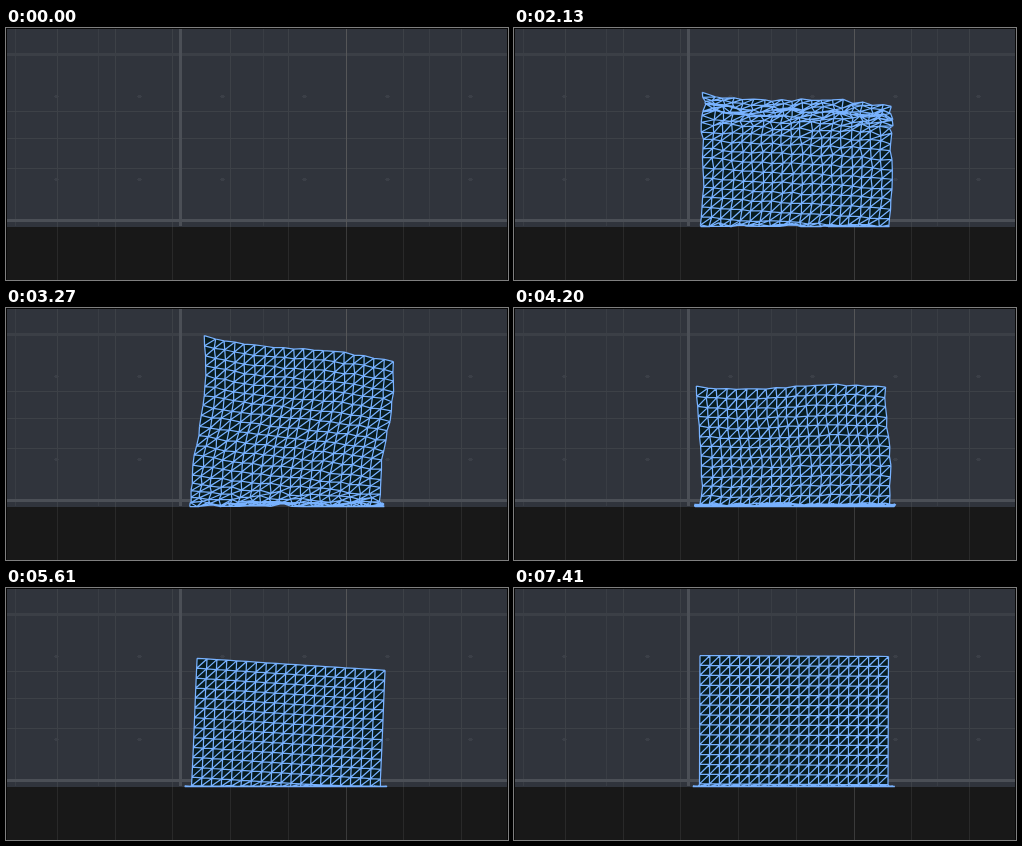
An HTML page with a canvas that plays this animation: 502 px wide and 252 px high, repeating every 7500 ms.

```html
<!DOCTYPE html>
<html lang="en">
<head>
<meta charset="utf-8">
<title>Soft body mesh</title>
<style>
  html, body { margin: 0; width: 100%; height: 100%; overflow: hidden; background: #181818; }
  canvas { display: block; }
</style>
</head>
<body>
<canvas id="stage" width="502" height="252"></canvas>
<script>
const ctx = document.getElementById('stage').getContext('2d');
const LOOP = 7500, STEP = 30, LAST = 7410;
const DROP = 480, HIT = 1230, SQUASHED = 1650, LANDED = 4200;
const COLS = 19, ROWS = 20, CELL = 9.9, FLOOR = 198, REST = 67, LEFT = 185;

const ramp = (v, a, b) => Math.max(0, Math.min(1, (v - a) / (b - a)));
const mix = (a, b, k) => a + (b - a) * k;
const smooth = k => k * k * (3 - 2 * k);
const hump = (t, a, b) => Math.sin(Math.PI * ramp(t, a, b));
const noise = (i, j) => {
  const n = Math.sin(i * 127.1 + j * 311.7) * 43758.5;
  return n - Math.floor(n) - 0.5;
};

// Eases through [time, value] points
function track(t, points) {
  let i = 0;
  while (i < points.length - 2 && t >= points[i + 1][0]) i++;
  const [[t0, v0], [t1, v1]] = points.slice(i, i + 2);
  return mix(v0, v1, smooth(ramp(t, t0, t1)));
}

// Height of the top left corner: fall, crush, rebound, then a fading bob
function topAt(t) {
  if (t < HIT) return 2 + 213 * (((t - DROP) / (HIT - DROP)) ** 2 - 1);
  if (t < SQUASHED) return mix(128, 2, (1 - ramp(t, HIT, SQUASHED)) ** 3);
  if (t < LANDED) return track(t, [[SQUASHED, 128], [2450, 32], [3270, 28], [3700, 88], [LANDED, 78]]);
  return REST + 11.5 * ramp(t, 6800, 6000) * Math.cos((t - LANDED) / 1165 * 2 * Math.PI);
}

function meshAt(t) {
  const top = topAt(t);
  const tilt = track(t, [[HIT, 12], [2130, 12], [3270, 25], [LANDED, 0], [5610, 12], [LAST, 1]]);
  const rough = ramp(t, HIT, 1440) * ramp(t, 5600, LANDED);
  const sway = 2.5 * ramp(t, HIT, 1440) * ramp(t, 6800, 6000) * Math.cos((t - LANDED) / 930 * Math.PI);

  // The impact folds the upper rows together and the fold spreads downwards
  const pitch = CELL + 6 * hump(t, HIT, SQUASHED);
  const fold = 0.92 * hump(t, HIT, 2400) ** 0.3;
  const foldWidth = 2 + Math.max(0, t - 1440) / 276;

  const floor = FLOOR + 15 * ramp(t, HIT + 90, HIT);
  const soft = 1.5 + 10 * hump(t, 2400, LANDED);
  const rest = y => floor - soft * Math.log(1 + Math.exp((floor - y) / soft));

  const rows = [];
  let drop = 0;
  for (let r = 0; r <= ROWS; r++) {
    const gap = pitch * (1 - fold * Math.exp(-(((r - 4) / foldWidth) ** 2)));
    if (r) drop += gap;
    rows.push(Array.from({ length: COLS + 1 }, (_, c) => {
      const u = c / COLS;
      const wave = 2 * rough * Math.sin(2 * Math.PI * u) * (1 - r / ROWS);
      const raw = top + drop + tilt * u + wave;
      const y = t < HIT ? raw : rest(raw);
      const above = t < HIT ? 198 - drop : FLOOR - y;
      const squash = 1 - (t < HIT ? gap : y - rest(raw - gap)) / pitch;
      const amp = 1.8 * rough + Math.max(0, squash) * (1 + 5 * rough);
      const spill = 14 * (u - 0.5) * ramp(raw, floor, floor + 60);
      const x = LEFT + 188.5 * u + tilt * above / 270 + sway * Math.sin((y - 127) / 24) + spill;
      return [x + noise(r, c) * amp + 0.5,
        Math.min(y + noise(c + 40, r) * amp, floor) + 0.5];
    }));
  }
  return rows;
}

function rect(color, x, y, w, h) {
  ctx.fillStyle = color;
  ctx.fillRect(x, y, w, h);
}

function drawRoom() {
  rect('#30343c', 0, 0, 502, 199);
  rect('#181818', 0, 199, 502, 53);
  for (let n = 0; n < 6; n++) {
    const x = Math.round(9 + n * 82.75);
    rect('#393d44', x, 0, 1, 198);
    for (const y of [68, 151]) {
      rect('#3b3f47', x + 39, y, 5, 1);
      rect('#3b3f47', x + 40, y - 1, 3, 3);
    }
  }
  for (let n = 0; n < 8; n++) {
    const x = Math.round(51 + n * 57.7);
    rect('#3d4147', x, 0, 1, 199);
    rect('#292929', x, 199, 1, 53);
  }
  rect('#3b3f46', 0, 25, 502, 3);
  for (const y of [83, 110, 140]) rect('#3d4147', 0, y, 502, 1);
  rect('#4b4f56', 173, 0, 3, 198);
  rect('#4b4f56', 0, 191, 502, 3);
  rect('#555658', 340, 0, 1, 199);
  rect('#3a3a3a', 340, 199, 1, 53);
  rect('#080808', 0, 0, 502, 1);
  rect('#080808', 0, 0, 1, 252);
  rect('#080808', 501, 0, 1, 252);
}

function drawMesh(m) {
  ctx.fillStyle = '#081c20';
  for (let r = 0; r < ROWS; r++) {
    for (let c = 0; c < COLS; c++) {
      ctx.beginPath();
      for (const p of [m[r][c], m[r][c + 1], m[r + 1][c + 1], m[r + 1][c]]) ctx.lineTo(...p);
      ctx.fill();
    }
  }
  const line = (p, q) => { ctx.moveTo(...p); ctx.lineTo(...q); };
  ctx.beginPath();
  for (let r = 0; r <= ROWS; r++) {
    for (let c = 0; c <= COLS; c++) {
      if (c < COLS) line(m[r][c], m[r][c + 1]);
      if (r < ROWS) line(m[r][c], m[r + 1][c]);
      if (r < ROWS && c < COLS) line(m[r][c + 1], m[r + 1][c]);
    }
  }
  ctx.strokeStyle = '#78b2ff';
  ctx.lineWidth = 1.25;
  ctx.stroke();
}

const start = performance.now();
function frame() {
  const now = (performance.now() - start) % LOOP;
  const t = Math.min(LAST, Math.floor(now / STEP) * STEP);
  drawRoom();
  if (t >= DROP) drawMesh(meshAt(t));
  requestAnimationFrame(frame);
}
frame();
</script>
</body>
</html>
```
